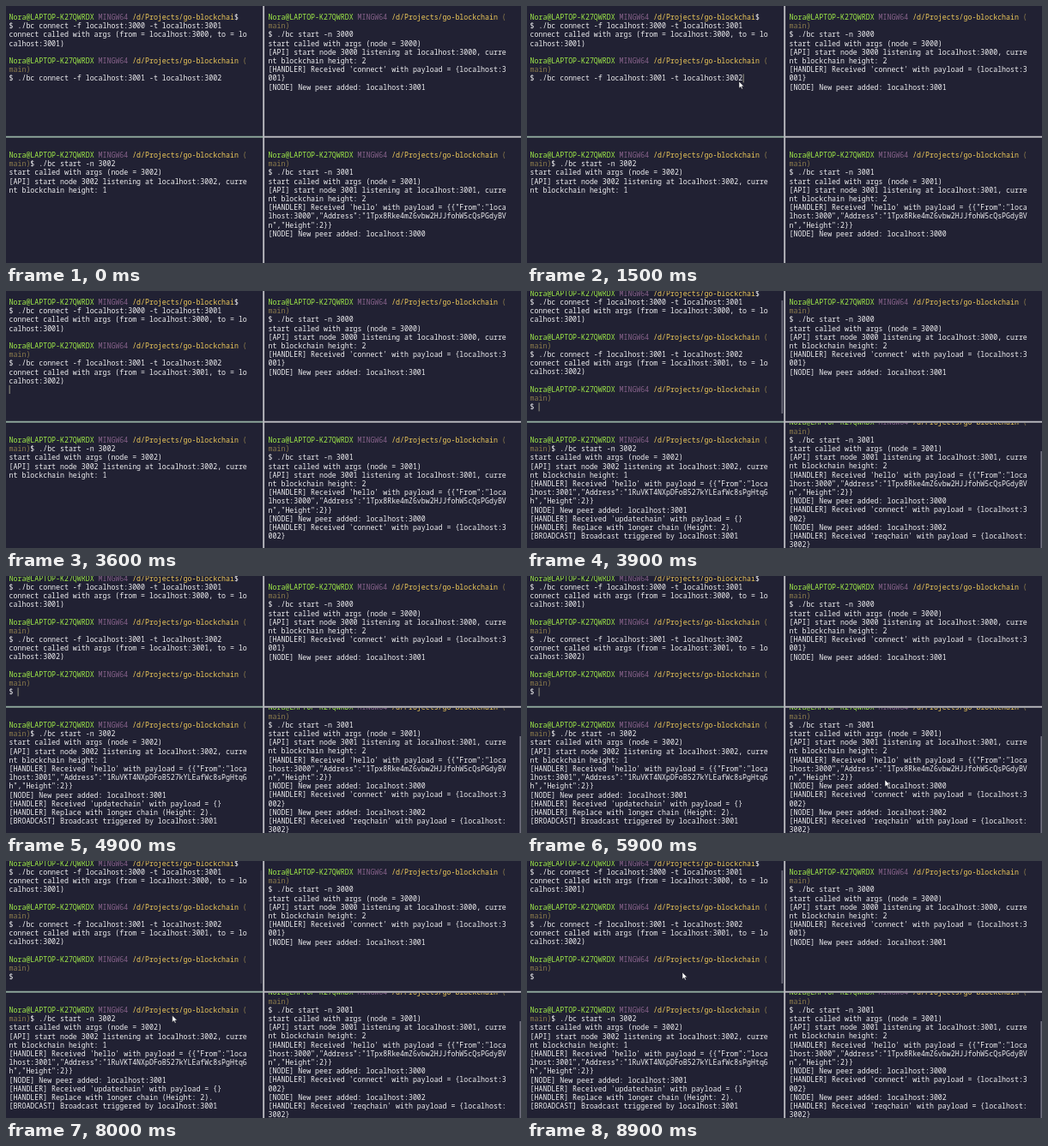
An HTML page that plays this animation: 600x300 px, repeating every 9 s.

```html
<!DOCTYPE html>
<html lang="en">
<head>
<meta charset="utf-8">
<title>Terminal panes</title>
<style>
html, body { margin: 0; width: 100%; height: 100%; overflow: hidden; background: #212133; }
svg { display: block; width: 600px; height: 300px; }
text { font: 500 8.267px "Noto Sans Mono", "DejaVu Sans Mono", monospace; white-space: pre; fill: #f0f0f2; }
.user { fill: #a0ec48; }
.sys { fill: #87628a; }
.path { fill: #f0cb5a; }
.git { fill: #8e7d4c; }
.bar { fill: #70707e; }
</style>
</head>
<body>
<svg id="stage" viewBox="0 0 600 300">
  <defs>
    <clipPath id="top"><rect width="600" height="152"/></clipPath>
    <clipPath id="bottom"><rect y="154" width="600" height="146"/></clipPath>
  </defs>
  <rect width="600" height="300" fill="#212133"/>
</svg>
<script>
const LOOP = 9000, COLS = 56, CELL = 4.96, ROW = 10.2;
const ENTER = 3400, OUTPUT = 3500, DONE = 3800;
const stage = document.getElementById('stage');

function add(parent, tag, attrs = {}, content) {
  const el = document.createElementNS('http://www.w3.org/2000/svg', tag);
  for (const key in attrs) el.setAttribute(key, attrs[key]);
  if (content) el.textContent = content;
  parent.appendChild(el);
  return el;
}
const show = (el, on) => el.setAttribute('visibility', on ? 'visible' : 'hidden');

const head = [['user', 'Nora@LAPTOP-K27QWRDX '], ['sys', 'MINGW64 ']];
const prompt = [...head, ['path', '/d/Projects/go-blockchain'], ['git', ' (']];
const branch = ['git', 'main)'];
const hello = (port, address) =>
  `[HANDLER] Received 'hello' with payload = {{"From":"localhost:${port}","Address":"${address}","Height":2}}`;
const received = (kind, port) => `[HANDLER] Received '${kind}' with payload = {localhost:${port}}`;
const peer = port => `[NODE] New peer added: localhost:${port}`;
const connect = (from, to) => `$ ./bc connect -f localhost:${from} -t localhost:${to}`;
const called = (from, to) => `connect called with args (from = localhost:${from}, to = localhost:${to})`;
const started = (port, height) => [
  `start called with args (node = ${port})`,
  `[API] start node ${port} listening at localhost:${port}, current blockchain height: ${height}`
];

// Each pane is a list of [time, lines]; long strings wrap at the pane width.
function pane(x, y, clip, blocks) {
  const box = add(stage, 'g', { 'clip-path': `url(#${clip})` });
  const body = add(box, 'g');
  let row = 0;
  const parts = blocks.map(([time, lines]) => {
    const el = add(body, 'g');
    for (const line of lines) {
      const rows = typeof line === 'string'
        ? (line.match(new RegExp(`.{1,${COLS}}`, 'g')) || ['']).map(s => [['', s]])
        : [line];
      for (const runs of rows) {
        const text = add(el, 'text', { x, y: y + ROW * row++ });
        for (const [cls, s] of runs) add(text, 'tspan', cls ? { class: cls } : {}, s);
      }
    }
    return { el, time };
  });
  return { body, parts };
}

const shell = pane(3.6, 15.9, 'top', [
  [0, [
    [...head, ['path', '/d/Projects/go-blockchai'], ['', '$']],
    connect(3000, 3001), called(3000, 3001), '',
    prompt, [branch], connect(3001, 3002)
  ]],
  [OUTPUT, [called(3001, 3002), '']],
  [DONE, [prompt, [branch], '$']]
]);
const first = pane(305.6, 15.9, 'top', [
  [0, [prompt, [branch], '$ ./bc start -n 3000', ...started(3000, 2), received('connect', 3001), peer(3001)]]
]);
const third = pane(3.6, 176.9, 'bottom', [
  [0, [prompt, [branch, ['', '$ ./bc start -n 3002']], ...started(3002, 1)]],
  [DONE, [
    hello(3001, '1RuVKT4NXpDFoB527kYLEafWc8sPgHtq6h'), peer(3001),
    "[HANDLER] Received 'updatechain' with payload = {}",
    '[HANDLER] Replace with longer chain (Height: 2).',
    '[BROADCAST] Broadcast triggered by localhost:3001'
  ]]
]);
const second = pane(305.6, 176.9, 'bottom', [
  [0, [
    prompt, [branch], '$ ./bc start -n 3001', ...started(3001, 2),
    hello(3000, '1Tpx8Rke4mZ6vbw2HJJfohW5cQsPGdyBVn'), peer(3000)
  ]],
  [OUTPUT, [received('connect', 3002)]],
  [DONE, [peer(3002), received('reqchain', 3002)]]
]);
const panes = [shell, first, second, third];

const caret = add(stage, 'rect', { width: .9, height: 10, fill: '#a3a38c' });
const shellBar = add(stage, 'rect', { class: 'bar', x: 296.5, y: 11, width: 1.6, height: 132 });
const nodeBar = add(stage, 'rect', { class: 'bar', x: 598.4, y: 187, width: 1.6, height: 113 });
add(stage, 'rect', { y: 151.8, width: 300, height: 1.9, fill: '#8fa89c' });
add(stage, 'rect', { x: 300, y: 151.8, width: 300, height: 1.9, fill: '#b9b9be' });
add(stage, 'rect', { x: 299.2, width: 1.9, height: 300, fill: '#b9b9be' });
const mouse = add(stage, 'path', {
  d: 'M0 0V8L1.9 6.3L3.2 9L4.4 8.5L3.2 5.8H5.7Z',
  fill: '#fff', stroke: '#15151f', 'stroke-width': .5
});

const clamp = v => Math.min(1, Math.max(0, v));
const ease = v => v * v * (3 - 2 * v);
// Pointer moves: start, end, x, y
const moves = [[5200, 5850, 417, 238], [6150, 6700, 219, 280], [7450, 8350, 181, 130]];

function pointer(t) {
  let x = 247, y = 88;
  for (const [start, end, toX, toY] of moves) {
    const k = ease(clamp((t - start) / (end - start)));
    x += (toX - x) * k;
    y += (toY - y) * k;
  }
  return [x, y];
}

function render(t) {
  const done = t >= DONE;
  for (const { parts } of panes)
    for (const { el, time } of parts) show(el, t >= time);
  shell.body.setAttribute('transform', `translate(0 ${done ? -ROW : 0})`);
  second.body.setAttribute('transform', `translate(0 ${done ? -2 * ROW : 0})`);

  const [col, row] = done ? [2, 12] : t >= OUTPUT ? [0, 10] : t >= ENTER ? [0, 8] : [50, 7];
  caret.setAttribute('x', 3.7 + col * CELL);
  caret.setAttribute('y', 8 + row * ROW);
  const phase = t < ENTER ? t - 200 : t - ENTER;
  show(caret, phase >= 0 && phase % 1200 < 600);

  const fade = t < 6000 ? 1 - clamp((t - 4300) / 500) : clamp((t - 7950) / 150);
  shellBar.setAttribute('opacity', done ? fade : 0);
  show(nodeBar, done);

  const [x, y] = pointer(t);
  mouse.setAttribute('transform', `translate(${x} ${y})`);
  show(mouse, (t >= 1300 && t < ENTER) || t >= 5200);
}

const origin = performance.now();
function tick() {
  render((performance.now() - origin) % LOOP);
  requestAnimationFrame(tick);
}
tick();
</script>
</body>
</html>
```
